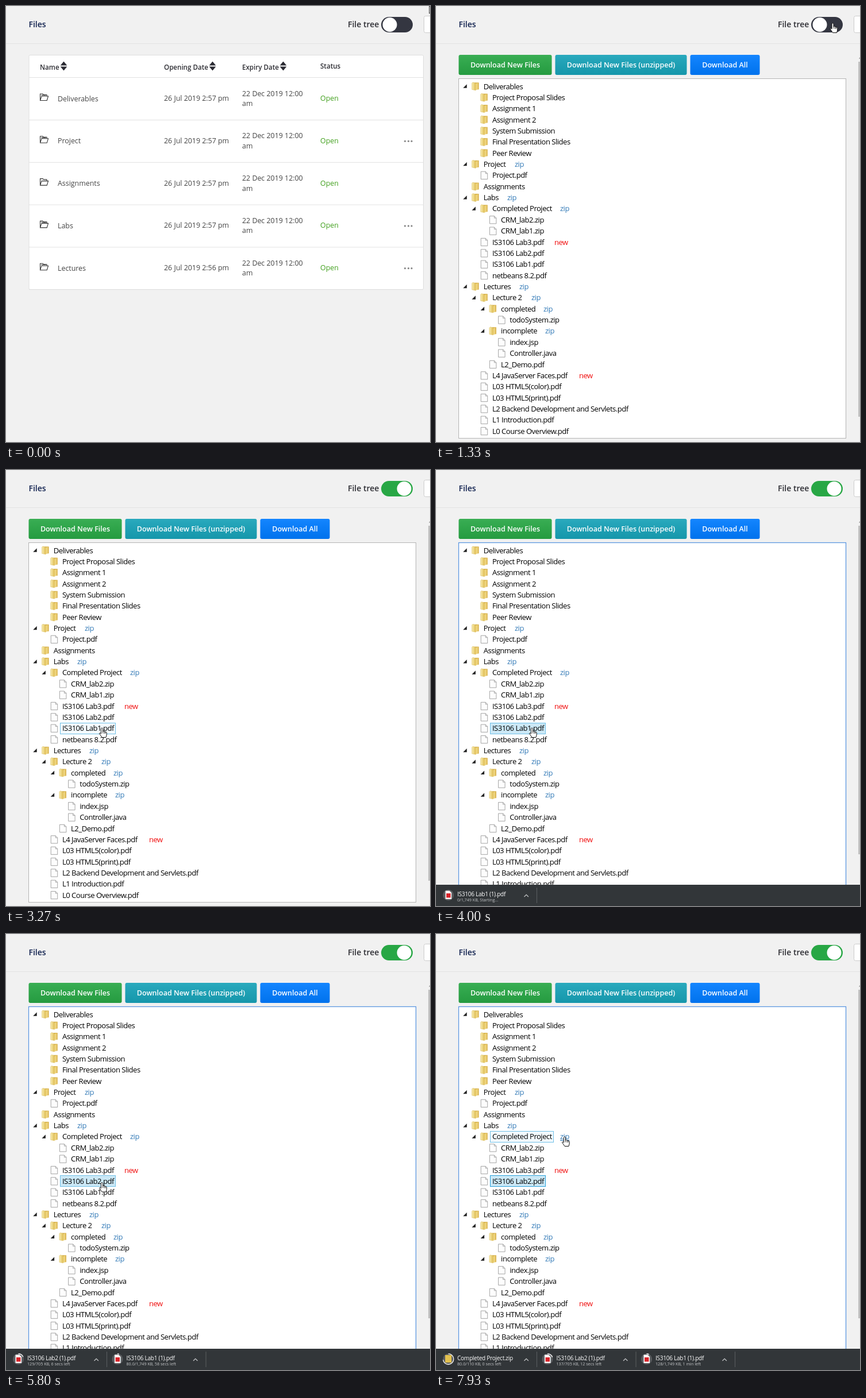
These frames come from a looping animation (738 px wide and 759 px high, 8000 ms). An HTML page:

```html
<!DOCTYPE html>
<html lang="en">
<head>
<meta charset="utf-8">
<title>File tree</title>
<style>
html, body { margin: 0; width: 100%; height: 100%; overflow: hidden; background: #f1f1f1; }
svg { display: block; font-family: "Open Sans", sans-serif; }
text { white-space: pre; }
.head { font-size: 14px; font-weight: 600; }
.column { font-size: 11.6px; font-weight: 600; fill: #2d2d33; }
.cell { font-size: 12.4px; fill: #444; }
.button { font-size: 12.5px; font-weight: 600; fill: #fff; text-anchor: middle; }
.node { font-size: 13px; letter-spacing: -.475px; }
.file { font-size: 10px; letter-spacing: -.25px; fill: #fff; }
.status { font-size: 7.2px; fill: #c4c6c8; }
</style>
</head>
<body>
<svg width="738" height="759" viewBox="0 0 738 759">
  <defs>
    <linearGradient id="sheen" x2="0" y2="1">
      <stop stop-color="#fff" stop-opacity=".08"/><stop offset="1" stop-color="#000" stop-opacity=".07"/>
    </linearGradient>
    <linearGradient id="gold"><stop stop-color="#fbefb4"/><stop offset="1" stop-color="#dfbd53"/></linearGradient>
    <g id="folder">
      <path d="M5-6.5h7.5v12H5z" fill="#d5ad43"/>
      <path d="M.5-5.5 2-7l5 1.5V7L.5 5.5z" fill="url(#gold)" stroke="#d9bd62" stroke-width=".6"/>
      <path d="M7-4.5 11-6v11L7 7z" fill="#edd27a"/>
    </g>
    <path id="file" d="M1-6.5h8l3.5 3.5v9.8H1zM9-6.5V-3h3.5" fill="#fdfdfd" stroke="#9a9a9a" stroke-width=".9"/>
    <path id="sort" d="M0-8 5.8-1H-5.8zM0 8 5.8 1H-5.8z" fill="#2b2b33"/>
    <path id="arrow" d="M0 0V13l3-2.8 2.1 4.9 2-.9-2-4.7h4.1z" fill="#fff" stroke="#111" stroke-width=".9"/>
    <g id="hand" fill="#fff" stroke="#111" stroke-linejoin="round">
      <path d="M-1.5 1.5Q0-1 1.5 1.5V6.5Q3 5 4 7 5.5 6 6 7.7 8 7 8.2 9V12.5L7 17H0L-4.3 10.5Q-4.5 8-1.5 10.5Z"/>
      <path d="M1.5 6V10M4 7V10.4M6 7.7V10.6" stroke-width=".8"/>
    </g>
  </defs>

  <path d="M0 65.5H738" stroke="#e2e2e2"/>
  <text class="head" x="39.5" y="37" fill="#10214f">Files</text>
  <text class="head" x="595" y="37" fill="#2d2d33">File tree</text>
  <rect x="727.5" y="17.5" width="30" height="29" rx="3" fill="#fff" stroke="#ccc"/>
  <rect id="track" x="653" y="19" width="55" height="27" rx="13.5"/>
  <circle id="knob" cy="32.5" r="12.5" fill="#fff"/>

  <g id="table"></g>
  <g id="tree">
    <g id="buttons"></g>
    <rect id="panel" x="39.5" y="126.5" width="674" height="626" fill="#fff"/>
    <rect id="selected" height="19" fill="#cbe8f6" stroke="#26a0da"/>
    <rect id="hovered" height="19" stroke="#70c0e7"/>
    <g id="nodes"></g>
    <rect id="thumb" x="735" y="97" width="3" fill="#c1c1c1"/>
    <path d="M736 91.5l2-2v2z" fill="#777"/>
  </g>
  <g id="shelf"></g>
  <use id="cursor"/>
</svg>

<script>
const $ = id => document.getElementById(id);
const set = (el, attrs) => Object.entries(attrs).forEach(([k, v]) => el.setAttribute(k, v));
const text = (cls, x, y, s, extra = "") => `<text class="${cls}" x="${x}" y="${y}" ${extra}>${s}</text>`;
const use = (id, x, y) => `<use href="#${id}" x="${x}" y="${y}"/>`;
const clamp = v => Math.min(1, Math.max(0, v));
const lerp = (a, b, k) => a + (b - a) * k;
const smooth = k => k * k * (3 - 2 * k);

// Table view
const folderRow = (name, i) => {
  const y = 160.5 + 73.8 * i;
  const full = name !== "Assignments";
  const outline = `M1 11V.5h4.5L7 2H12.5V4.5M1 12 3.5 4.5H15L12.7 12Z${full ? "M3 2.8H11" : ""}`;
  const dots = [694.5, 700.5, 706].map(x => `<circle cx="${x}" cy="${y + 1}" r="1.6" fill="#888"/>`).join("");
  return `<path d="M40 ${y + 38}H726" stroke="#e2e2e2"/>
    <path transform="translate(58.5 ${y - 8})" d="${outline}" fill="none" stroke="#333" stroke-width="1.1"/>` +
    text("cell", 90, y + 5, name) +
    text("cell", 275, y + 4.5, `26 Jul 2019 2:${name === "Lectures" ? 56 : 57} pm`) +
    text("cell", 411, y - 4, "22 Dec 2019 12:00") + text("cell", 411, y + 13.5, "am") +
    text("cell", 547, y + 4.5, "Open", 'style="fill:#42a01e"') +
    (/Project|Labs|Lectures/.test(name) ? dots : "");
};
$("table").innerHTML = `<rect x="40" y="85.5" width="686.5" height="408" rx="2" fill="#fff"/>
  <path d="M40 124.5H726" stroke="#e2e2e2"/>` +
  text("column", 59, 111, "Name") + text("column", 275, 111, "Opening Date") +
  text("column", 411, 111, "Expiry Date") + text("column", 547, 108.5, "Status") +
  [100.5, 359.5, 482.5].map(x => use("sort", x, 104.5)).join("") +
  ["Deliverables", "Project", "Assignments", "Labs", "Lectures"].map(folderRow).join("") +
  `<rect x="40" y="85.5" width="686.5" height="408" rx="2" fill="none" stroke="#dedede"/>`;

// Tree view
$("buttons").innerHTML = [
  [39.5, 162, "#28a745", "Download New Files"],
  [207.5, 229, "#17a2b8", "Download New Files (unzipped)"],
  [442.5, 121, "#007bff", "Download All"]
].map(([x, w, color, label]) => [color, "url(#sheen)"].map(fill =>
  `<rect x="${x}" y="85" width="${w}" height="35" rx="3" fill="${fill}"/>`).join("") +
  text("button", x + w / 2, 106.5, label)).join("");

// Indent gives the depth; an optional tag follows with its x position.
const nodes = `Deliverables
 Project Proposal Slides
 Assignment 1
 Assignment 2
 System Submission
 Final Presentation Slides
 Peer Review
Project|zip|137
 Project.pdf
Assignments
Labs|zip|124
 Completed Project|zip|216
  CRM_lab2.zip
  CRM_lab1.zip
 IS3106 Lab3.pdf|new|206
 IS3106 Lab2.pdf
 IS3106 Lab1.pdf
 netbeans 8.2.pdf
Lectures|zip|145
 Lecture 2|zip|166
  completed|zip|187
   todoSystem.zip
  incomplete|zip|190
   index.jsp
   Controller.java
  L2_Demo.pdf
 L4 JavaServer Faces.pdf|new|249
 L03 HTML5(color).pdf
 L03 HTML5(print).pdf
 L2 Backend Development and Servlets.pdf
 L1 Introduction.pdf
 L0 Course Overview.pdf`.split("\n").map((line, i) => {
  const [title, tag, tagX] = line.split("|");
  const name = title.trim(), depth = title.length - name.length;
  return { name, depth, tag, tagX, x: 82.7 + 15.2 * depth, y: 139.8 + 19.36 * i };
});
$("nodes").innerHTML = nodes.map(({ name, depth, tag, tagX, x, y }, i) => {
  const open = nodes[i + 1]?.depth > depth;
  const isFile = /\.(pdf|zip|jsp|java)$/.test(name);
  return (open ? `<path d="M${x - 29} ${y - 3.5}v6.5h-6.5z" fill="#222"/>` : "") +
    use(isFile ? "file" : "folder", x - 20.7, y) +
    text("node title", x, y + 4.7, name) +
    (tag ? text("node", tagX, y + 4.7, tag,
      `fill="${tag === "zip" ? "#337ab7" : "#f00d0d"}"${name === "Completed Project" ? ' id="zipLink"' : ""}`) : "");
}).join("");
document.querySelectorAll(".title").forEach((el, i) => nodes[i].width = el.getComputedTextLength());

const LAB2 = 15, LAB1 = 16;
const frameNode = (box, i) => {
  const node = nodes[i];
  box.style.display = node ? "" : "none";
  if (node) set(box, { x: Math.round(node.x - 4) + .5, y: Math.round(node.y - 9.8) + .5, width: Math.round(node.width + 6.5) });
};

// Pointer: time, x, y, shape from that time on
const path = [
  [0, 737, 0, "arrow"], [300, 704, 21, "hand"], [530, 690.5, 29.5, "hand"], [1940, 690.5, 29.5, "hand"],
  [2070, 660, 58, "arrow"], [2330, 506, 212.5, "arrow"], [2800, 240, 393, "arrow"], [3000, 190, 432, "hand"],
  [3130, 172, 445, "hand"], [3210, 172, 445, "hand"], [3260, 167, 448.5, "hand"], [4340, 167, 448.5, "hand"],
  [4600, 167, 434, "hand"], [4740, 167, 434, "hand"], [4920, 167, 432, "hand"], [6010, 167, 432, "hand"],
  [6130, 182, 400, "arrow"], [6270, 206, 358, "arrow"], [6330, 213, 355.5, "arrow"], [6470, 216, 348, "arrow"],
  [6600, 216, 348, "arrow"], [6660, 224, 352.5, "hand"], [8000, 224, 352.5, "hand"]
];
const pointerAt = t => {
  const i = Math.max(1, path.findIndex(p => p[0] > t));
  const a = path[i - 1], b = path[i], k = clamp((t - a[0]) / (b[0] - a[0]));
  return { x: lerp(a[1], b[1], k), y: lerp(a[2], b[2], k), shape: a[3] };
};

// Downloads, newest first; each step: time, amount, time left
const downloads = [
  { name: "Completed Project.zip", total: "110", steps: [
    [7460, "0", "Starting..."], [7790, "65.4", "0 secs left"], [7920, "80.0", "0 secs left"]] },
  { name: "IS3106 Lab2 (1).pdf", total: "705", steps: [
    [5190, "0", "Starting..."], [5390, "65.4", "7 secs left"], [5790, "129", "6 secs left"], [6060, "129", "8 secs left"],
    [7120, "129", "9 secs left"], [7260, "129", "10 secs left"], [7790, "137", "12 secs left"]] },
  { name: "IS3106 Lab1 (1).pdf", total: "1,749", steps: [
    [3720, "0", "Starting..."], [4390, "32.7", "52 secs left"], [4590, "65.4", "46 secs left"],
    [4790, "65.4", "49 secs left"], [4920, "65.4", "51 secs left"], [5390, "65.4", "55 secs left"],
    [5790, "80.0", "58 secs left"], [6060, "80.0", "1 min left"], [6920, "80.0", "2 min left"], [7920, "128", "1 min left"]] }
];
const downloadItem = ({ name, total, steps }, i, t) => {
  const [, done, left] = steps.findLast(s => s[0] <= t);
  const share = 100 * parseFloat(done) / parseFloat(total.replace(",", ""));
  const icon = name.endsWith("zip")
    ? `<rect x="16" y="733" width="11" height="13" fill="#e3c14f"/>`
    : `<path d="M16.5 732.5h7l3.5 3.5v11H16.5z" fill="#fff"/><rect x="18" y="737" width="7.5" height="7.5" fill="#d8232a"/>`;
  return `<g transform="translate(${172.5 * i} 0)">
    <circle cx="21.5" cy="740" r="9.5" fill="#5a5d60"/>
    <circle cx="21.5" cy="740" r="9.2" fill="none" stroke="#f1f1f1" stroke-width="1.4" pathLength="100"
      stroke-dasharray="${share} 100" transform="rotate(-90 21.5 740)"/>${icon}
    ${text("file", 37, 741.5, name)}${text("status", 37, 751, `${done}/${total} KB, ${left}`)}
    <path d="M153.5 743l3.7-3.7 3.7 3.7" fill="none" stroke="#c4c6c8" stroke-width="1.2"/>
    <path d="M175.5 727V754" stroke="#5b5e61"/></g>`;
};

let shelfMarkup = "";
function draw(now) {
  const t = now % 8000;
  const treeShown = t >= 1320, clicked = t >= 3660;
  $("table").style.display = treeShown ? "none" : "";
  $("tree").style.display = treeShown ? "" : "none";

  const on = smooth(clamp((t - 1345) / 320));
  const mix = [[52, 40], [54, 167], [65, 69]].map(([a, b]) => lerp(a, b, on));
  set($("track"), { fill: `rgb(${mix})` });
  set($("knob"), { cx: lerp(668, 693, on) });

  const { x, y, shape } = pointerAt(t);
  set($("cursor"), { href: "#" + shape, x, y });

  const hoverY = pointerAt(Math.max(0, t - 30)).y;
  const hover = t > 2000 ? Math.round((hoverY - 139.8) / 19.36) : -1;
  const selected = t >= 5190 ? LAB2 : clicked ? LAB1 : -1;
  frameNode($("hovered"), hover);
  frameNode($("selected"), selected);
  set($("hovered"), { fill: hover === selected ? "#cbe8f6" : "#f2f9fd" });
  set($("panel"), { stroke: clicked ? "#5c97e0" : "#b4b4b4", "stroke-width": clicked ? 1.3 : 1 });
  set($("zipLink"), { "text-decoration": t >= 6660 ? "underline" : "none" });

  const rise = smooth(clamp((t - 3720) / 270));
  set($("thumb"), { height: lerp(618, 572, rise) });
  const items = downloads.filter(d => d.steps[0][0] <= t);
  const markup = `<rect y="722" width="738" height="37" fill="#323639"/>` +
    items.map((d, i) => downloadItem(d, i, t)).join("");
  if (markup !== shelfMarkup) $("shelf").innerHTML = shelfMarkup = markup;
  set($("shelf"), { transform: `translate(0 ${38 * (1 - rise)})` });
}

const start = performance.now();
(function tick() {
  draw(performance.now() - start);
  requestAnimationFrame(tick);
})();
</script>
</body>
</html>
```
